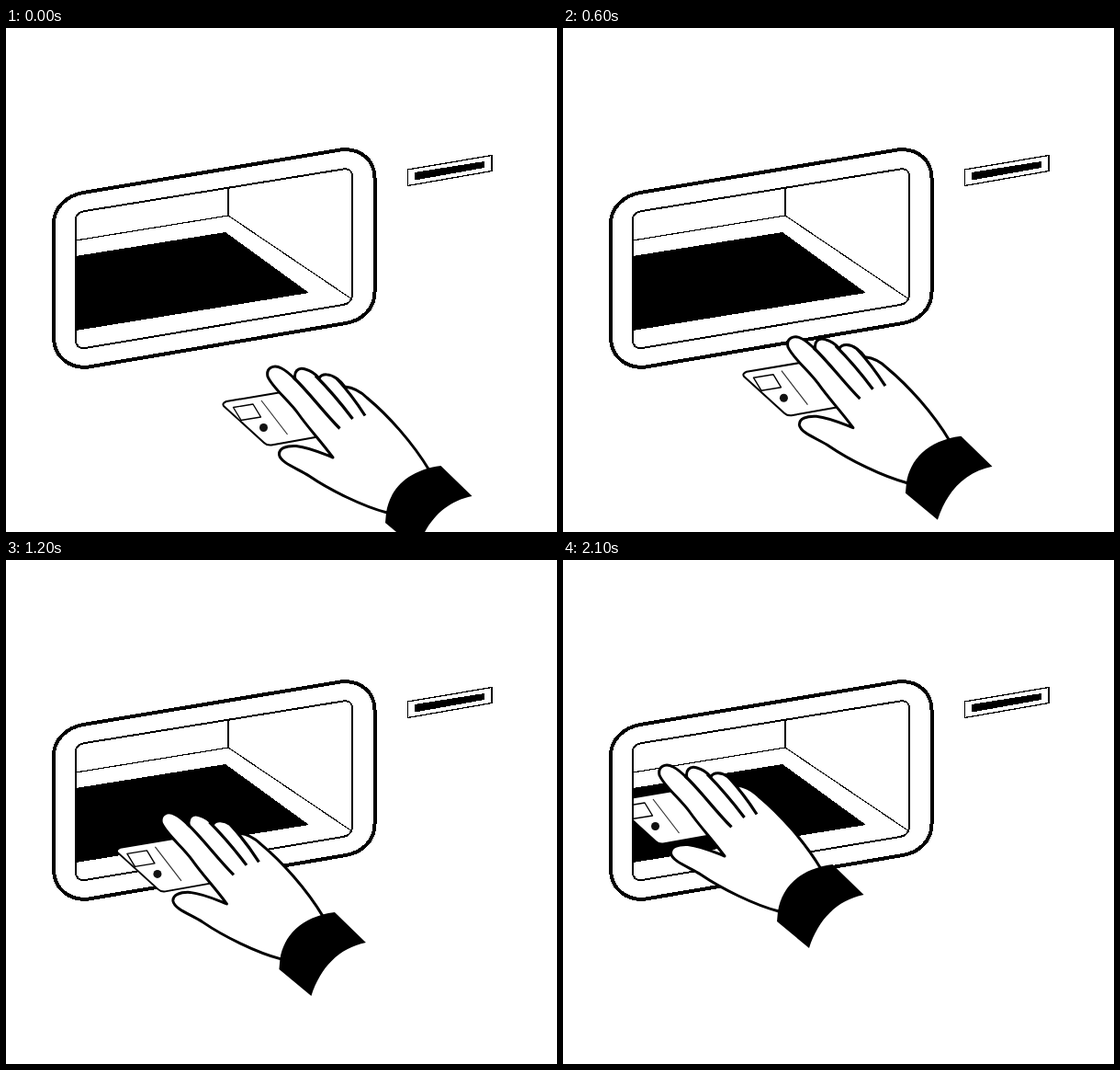
Animation of 600 by 548 pixels, one loop 2500 ms. Source, as an HTML page:

```html
<!DOCTYPE html>
<html lang="en">
<head>
<meta charset="utf-8">
<title>Card and hand</title>
<style>
  html, body { margin: 0; width: 100%; height: 100%; overflow: hidden; background: #fff; }
  svg { display: block; width: 100%; height: 100%; }
</style>
</head>
<body>
<svg viewBox="0 0 600 548" fill="none" stroke="#000" stroke-linejoin="round">
  <defs>
    <clipPath id="opening"><rect x="77" width="523" height="548"/></clipPath>
  </defs>

  <g shape-rendering="crispEdges">
    <!-- Compartment -->
    <path stroke-width="4" d="M52 212C52 195 67 182 84 179L364 132.500C385 130 401.500 143 401.500 163V287C401.500 305 388 318 370 321L90 368.500C69 371 52 357 52 337Z"/>
    <path stroke-width="1.2" d="M76 231L242 204L377 295"/>
    <path stroke-width="1.6" d="M242 174V204"/>
    <path fill="#000" stroke="none" d="M76 248L239 222L330 288L76 329Z"/>
    <path stroke-width="2" d="M76 208C76 203 80 200 86 199L367 153.500Q377 152 377 162V290C377 296 373 300 367 301L86 348Q76 349 76 339Z"/>

    <!-- Slot -->
    <path stroke-width="1.3" stroke-linejoin="miter" d="M437.500 154L529 138.500V155.500L437.500 171.500Z"/>
    <path fill="#000" stroke="none" d="M445 157L521 145V152L445 165.500Z"/>
  </g>

  <g clip-path="url(#opening)">
    <g id="mover">
      <!-- Card -->
      <path fill="#fff" stroke-width="2" d="M237 411Q235 408 240 406L300 396L348 443L289 453.500Q284 454 281 451Z"/>
      <path stroke-width="1.4" d="M247.500 412.500L269 409L277.500 423L256 426.500Z"/>
      <path stroke="#333" stroke-width="1.2" d="M278 405L306.500 442"/>
      <circle cx="280.500" cy="434.500" r="4.500" fill="#111" stroke="none"/>

      <!-- Hand -->
      <path fill="#fff" stroke-width="3" d="M415 527C388 520 352 502 330 487C318 479 299 473 297.500 464C297 457 305 454 316 454.500C330 456 341 461 356 467C342 448 330 436 318 419C308 405 290 391 285 379C283 370 291 365 300 370C306 373 311 378 315 382C313 374 318 368 326 371C333 373 337 376 341 381C344 375 353 376 360 381C364 384 367 387 369 390C378 391 386 395 393 402C416 421 443 451 461 481Z"/>
      <g stroke-width="3.2">
        <path d="M313 380C330 396 345 417 363.500 435.500"/>
        <path d="M337 378C352 393 367 411 377.500 425"/>
        <path d="M360 381C372 394 383 409 391 421.500"/>
      </g>

      <!-- Sleeve -->
      <path fill="#000" stroke="none" d="M413 538L414 527C418 502 436 481 473.500 476L507.500 509C478 515 458 536 448 567Z"/>
    </g>
  </g>
</svg>
<script>
  const LOOP = 2500, STEP = 100, LAST_MOVE = 2100;
  const EASE_START = -80, EASE_SPAN = 2160;
  const TRAVEL = { x: -180.6, y: -145.5 };
  const mover = document.getElementById('mover');

  function ease(time) {
    const u = Math.min(1, (time - EASE_START) / EASE_SPAN);
    return (1 - Math.cos(Math.PI * u)) / 2;
  }

  function render(time) {
    const stepped = Math.min(LAST_MOVE, Math.floor(time / STEP) * STEP);
    const progress = ease(stepped) - ease(0);
    mover.setAttribute('transform', `translate(${TRAVEL.x * progress} ${TRAVEL.y * progress})`);
  }

  const start = performance.now();
  function tick() {
    render((performance.now() - start) % LOOP);
    requestAnimationFrame(tick);
  }
  tick();
</script>
</body>
</html>
```
